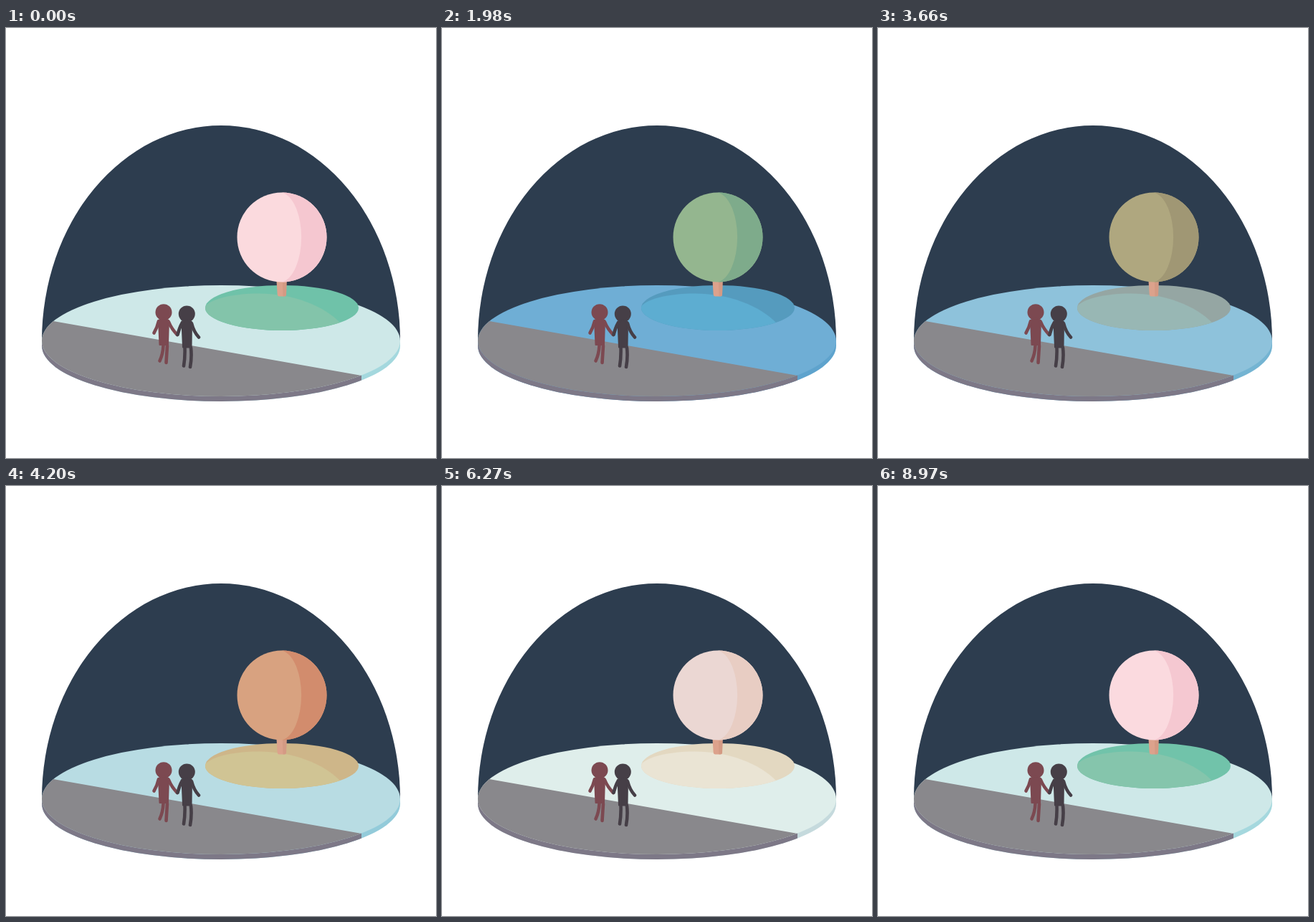
Recreate the animation shown at these times as an HTML page. Size 600 px wide and 600 px high, loop 9000 ms.

```html
<!DOCTYPE html>
<html lang="en">
<head>
<meta charset="utf-8">
<title>Four seasons under a dome</title>
<style>
  html, body { margin: 0; width: 100%; height: 100%; overflow: hidden; background: #fff; }
  svg { display: block; width: 100%; height: 100%; }
  .limbs { fill: none; stroke-width: 4.6; stroke-linecap: round; stroke-linejoin: round; }
  .red { fill: #7c4951; stroke: #7c4951; }
  .dark { fill: #463f47; stroke: #463f47; }
  .red .limbs, .dark .limbs { fill: none; }
  .body { stroke-width: 2; stroke-linejoin: round; }
  .head { stroke: none; }
</style>
</head>
<body>
<svg viewBox="0 0 600 600">
  <defs>
    <clipPath id="disc"><ellipse cx="300" cy="436.5" rx="250" ry="77.5"/></clipPath>
    <clipPath id="rim"><path d="M50 436.5V443.500A250 77.500 0 0 0 550 443.500V436.500Z"/></clipPath>
    <clipPath id="mound"><ellipse cx="385" cy="390.500" rx="107" ry="31.500"/></clipPath>
  </defs>

  <path fill="#2d3d4f" d="M50 436.500A250 300.500 0 0 1 550 436.500Z"/>
  <g clip-path="url(#rim)">
    <rect x="50" y="430" width="500" height="100" fill="var(--rim)"/>
    <rect x="50" y="430" width="446" height="100" fill="#7d7887"/>
  </g>
  <g clip-path="url(#disc)">
    <rect x="50" y="355" width="500" height="165" fill="var(--ground)"/>
    <path fill="#89888c" d="M40 404.300L66 409L496 485L530 530H40Z"/>
  </g>

  <g clip-path="url(#mound)">
    <rect x="270" y="355" width="230" height="70" fill="var(--hillShade)"/>
    <path fill="var(--hill)" d="M276 391C284 377 320 370.500 352 370.500C400 370.500 443 387 467 412V425H276Z"/>
  </g>

  <path fill="#dca28c" d="M377 345H392L391 372Q391 374.500 388 374.500H381.500Q379 374.500 378.700 372Z"/>
  <path fill="#cf9680" d="M385.500 345H392L391 372Q391 374.500 388 374.500H386.500Z" opacity=".65"/>
  <circle cx="385" cy="292" r="62.500" fill="var(--leaf)"/>
  <path fill="var(--leafShade)" d="M385 229.500A62.500 62.500 0 0 1 385 354.500A31 63 0 0 0 385 229.500Z"/>

  <g class="red">
    <circle class="head" cx="220" cy="396.700" r="11.500"/>
    <path class="body" d="M213 408Q220 403 227 408L226 442H214.500Z"/>
    <path class="limbs" d="M213 409Q211 418 206.500 425.500M227 410Q231 420 239 428M219.500 443Q219 455 214.500 464.500M225 443L223.500 467"/>
  </g>
  <g class="dark">
    <circle class="head" cx="252.300" cy="399" r="11.500"/>
    <path class="body" d="M245.500 410Q252 405.500 259 410L258.500 445.500H247Z"/>
    <path class="limbs" d="M246 411Q242 418 239.500 428M259 412Q262 424 269 431.500M249.500 446Q250 460 248 471.500M258 446Q259.500 460 257 473"/>
  </g>
</svg>

<script>
  const HOLD = 750, FADE = 1500, SEASON = HOLD + FADE;

  // Each row runs spring, summer, autumn, winter.
  const palette = {
    ground:    ['cee8e8', '5aa1d1', 'd0ebe8', 'e6efed'],
    rim:       ['a4d8de', '4f97c9', 'a4d8de', 'd4dbdd'],
    leaf:      ['fbdade', '7eae7e', 'ee9f80', 'e9f1fa'],
    leafShade: ['f5c7d0', '64a57c', 'ed8669', 'e6efed'],
    hill:      ['83c4aa', '55a8da', 'eecb83', 'e8f0fa'],
    hillShade: ['6fc2a9', '4f93c3', 'edbf7a', 'dfe3e2']
  };

  const rgb = hex => [0, 2, 4].map(i => parseInt(hex.slice(i, i + 2), 16));
  const mix = (a, b, p) => {
    const end = rgb(b);
    return `rgb(${rgb(a).map((v, i) => Math.round(v + (end[i] - v) * p))})`;
  };

  function draw() {
    const t = performance.now() % (SEASON * 4);
    const season = Math.floor(t / SEASON);
    const p = Math.max(0, (t % SEASON - HOLD) / FADE);
    for (const [name, colors] of Object.entries(palette)) {
      const color = mix(colors[season], colors[(season + 1) % 4], p);
      document.documentElement.style.setProperty('--' + name, color);
    }
    requestAnimationFrame(draw);
  }
  draw();
</script>
</body>
</html>
```
